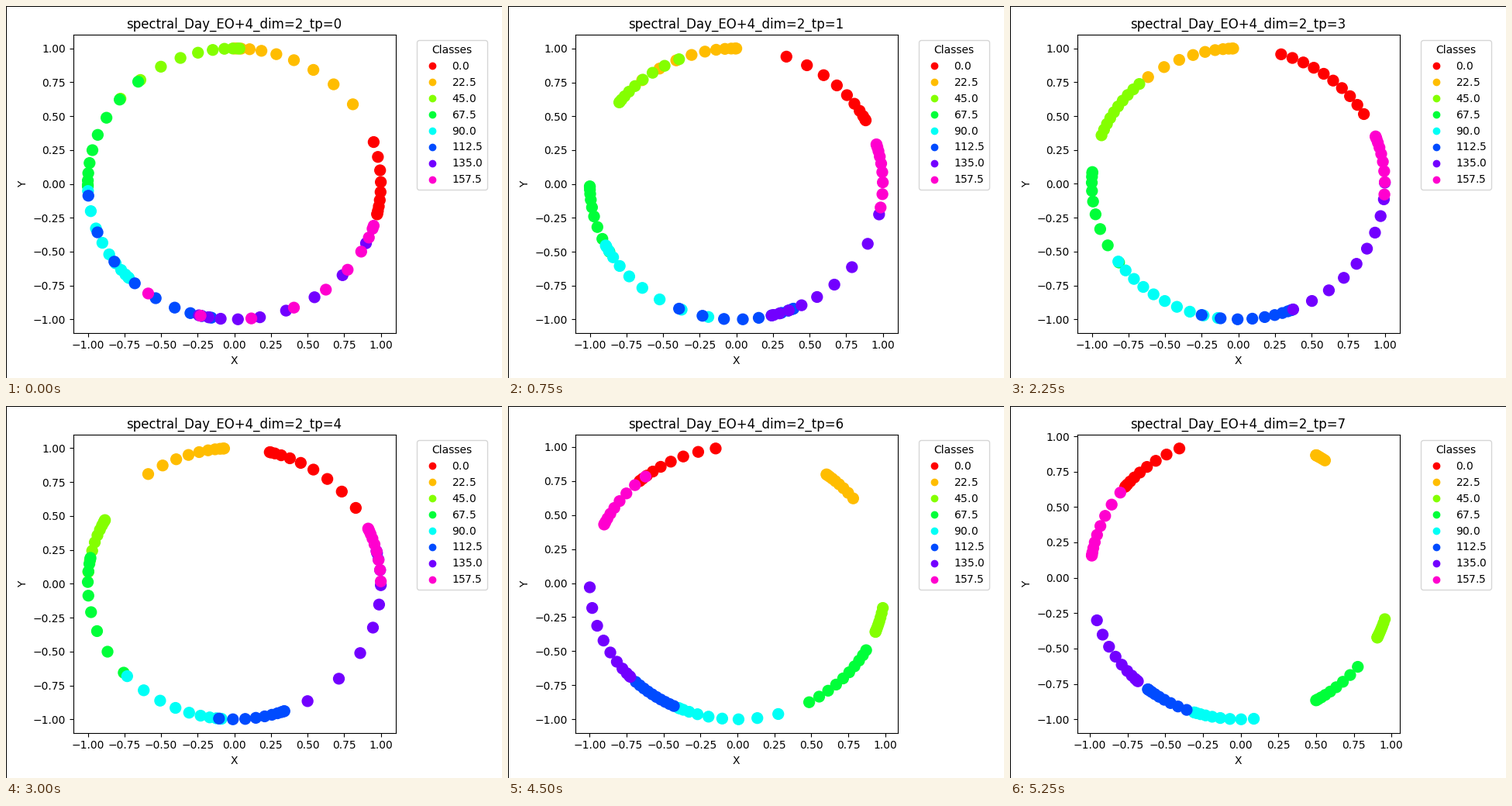
Recreate the animation shown at these times as a matplotlib script. Size 640 by 480 pixels, loop 6000 ms.

```python
import numpy as np
import matplotlib.pyplot as plt
from matplotlib.animation import FuncAnimation
from matplotlib.patches import Rectangle

STEPS = 8
STEP_MS = 750
DOTS = 10
CLASSES = np.arange(8) * 22.5

# Per step and class: the crowded end and the sparse end of its arc, degrees.
ARCS = {
    0: [(-13, 18), (90, 36), (88, 141), (181, 131),
        (224, 183), (261, 185), (256, 334), (342, 234)],
    1: [(28, 70), (90, 130), (143, 113), (181, 210),
        (207, 259), (293, 247), (284, 347), (377, 350)],
    2: [(276, 226), (280, 329), (333, 347), (28, -1),
        (106, 39), (123, 96), (201, 195), (220, 206)],
    4: [(76, 34), (94, 126), (152, 175), (169, 221),
        (265, 223), (290, 264), (374, 300), (384, 361)],
    5: [(123, 83), (46, 21), (343, 356), (340, 298),
        (241, 297), (240, 221), (220, 166), (138, 114)],
    7: [(140, 114), (60, 56), (335, 343), (300, 321),
        (252, 275), (232, 249), (227, 197.5), (171, 143)],
}


def spread(step):
    """Angles of every class, thinning out quadratically along its arc."""
    start, end = np.array(ARCS[step], float).T[:, :, None]
    return np.sort(start + (end - start) * np.linspace(0, 1, DOTS) ** 2)


angles = {step: spread(step) for step in ARCS}
angles[3] = (angles[1] + angles[4]) / 2
angles[6] = (angles[5] + angles[7]) / 2

fig, ax = plt.subplots(figsize=(6.4, 4.8), dpi=100)
fig.add_artist(Rectangle((0, 0), 1, 1, transform=fig.transFigure,
                         fill=False, ec="black", lw=0.72))


def draw(step):
    theta = np.radians(angles[step].ravel())
    ax.clear()
    dots = ax.scatter(np.cos(theta), np.sin(theta), s=100,
                      c=np.repeat(CLASSES, DOTS),
                      cmap="hsv", vmin=0, vmax=180)
    ax.set_title(f"spectral_Day_EO+4_dim=2_tp={step}")
    ax.set_xlabel("X")
    ax.set_ylabel("Y")
    ax.legend(*dots.legend_elements(), title="Classes",
              bbox_to_anchor=(1.05, 1), loc="upper left")
    return [dots]


draw(0)
fig.tight_layout()
anim = FuncAnimation(fig, draw, frames=STEPS, interval=STEP_MS,
                     init_func=lambda: draw(0), repeat=True, repeat_delay=0)
plt.show()
```
